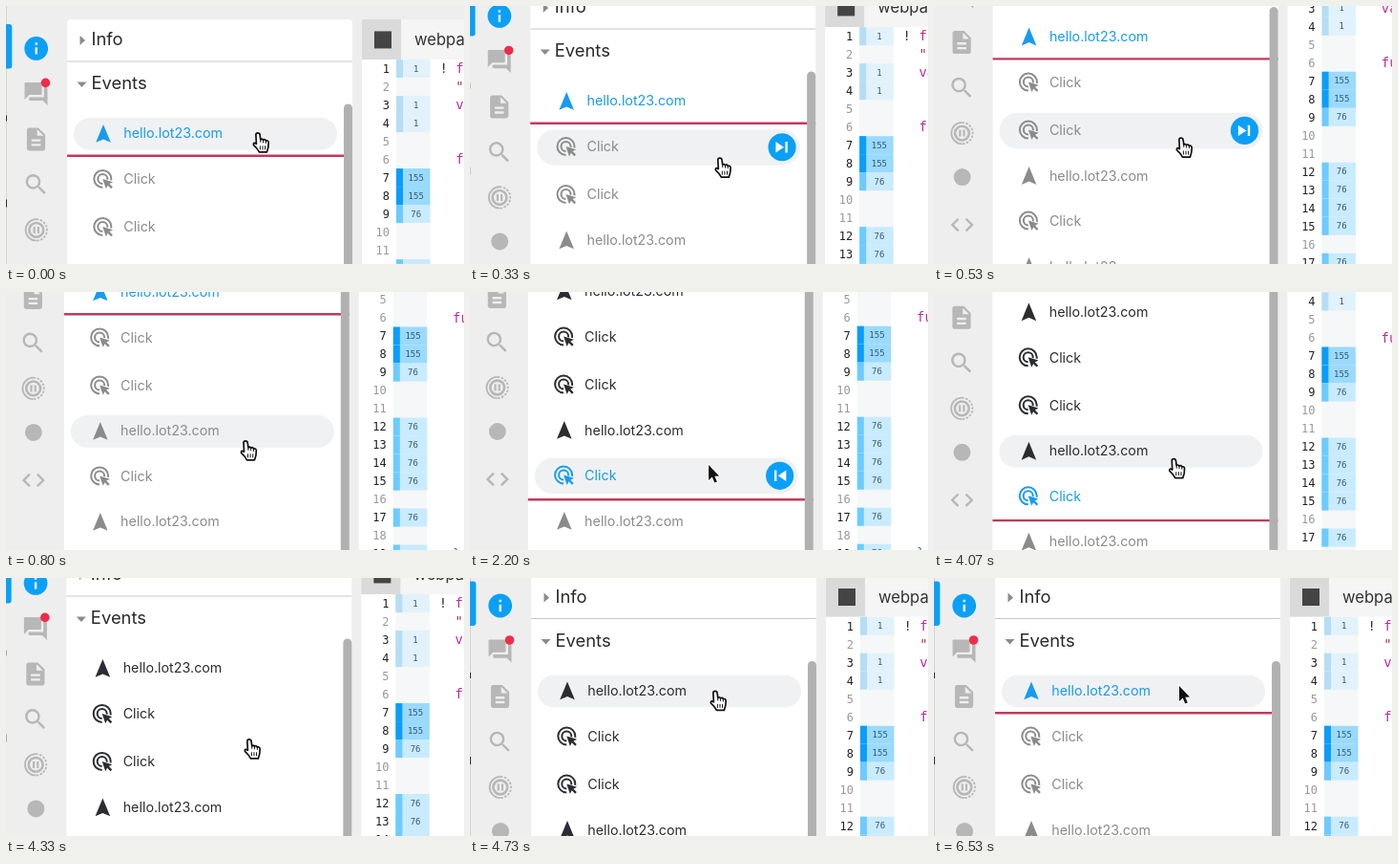
Animation, 480 px wide and 270 px high, one loop 8930 ms. Source, as an HTML page with a canvas:

```html
<!DOCTYPE html>
<html lang="en">
<head>
<meta charset="utf-8">
<title>Event list</title>
<style>
html, body { margin: 0; width: 100%; height: 100%; overflow: hidden; background: #fff; }
canvas { display: block; width: 480px; height: 270px; }
</style>
</head>
<body>
<canvas id="stage" width="480" height="270"></canvas>
<script>
const ctx = document.getElementById('stage').getContext('2d');
const LOOP = 8930, STEP = 200 / 3;
const BLUE = '#0aa0f8', DARK = '#2b2d31', GREY = '#8b8b8b', RAIL_ICON = '#b7b7b7';
const SANS = 'Inter, sans-serif', MONO = '"DejaVu Sans Mono", monospace';

const icons = {
  info: 'M12 2C6.48 2 2 6.48 2 12s4.48 10 10 10 10-4.48 10-10S17.52 2 12 2zm1 15h-2v-6h2v6zm0-8h-2V7h2v2z',
  chat: 'M21 6h-2v9H6v2c0 .55.45 1 1 1h11l4 4V7c0-.55-.45-1-1-1zm-4 6V3c0-.55-.45-1-1-1H3c-.55 0-1 .45-1 1v14l4-4h10c.55 0 1-.45 1-1z',
  file: 'M14 2H6c-1.1 0-2 .9-2 2v16c0 1.1.9 2 2 2h12c1.1 0 2-.9 2-2V8l-6-6zm2 16H8v-2h8v2zm0-4H8v-2h8v2zm-3-5V3.5L18.5 9H13z',
  search: 'M15.5 14h-.8l-.3-.3A6.5 6.5 0 1 0 13.7 14.4l.3.3v.8l5 5 1.5-1.5zm-6 0a4.5 4.5 0 1 1 0-9 4.5 4.5 0 0 1 0 9z',
  code: 'M9.4 16.6L4.8 12l4.6-4.6L8 6l-6 6 6 6zM14.6 16.6l4.6-4.6-4.6-4.6L16 6l6 6-6 6z',
  nav: 'M12 2.5L4.2 21.3 12 18l7.8 3.3z',
  pointer: 'M12 12l3.7 11 2-3.8 3.6 3.6 1.8-1.8-3.6-3.6 3.8-2z',
  next: 'M5 6v12l9-6zM15.5 6h2.5v12h-2.5z',
  back: 'M19 6v12l-9-6zM6 6h2.5v12H6z'
};
for (const name in icons) icons[name] = new Path2D(icons[name]);

const hand = new Path2D('M-2.5 2Q-2.5 0-.5 0 1.5 0 1.7 2L2.4 7Q4 5.5 5 7.5 7 6 8 8.3 10.5 7.5 10.8 10 11 15 9 20H1Q-1 16-5 12.5-5.5 9.2-2 11.5z');
const knuckles = new Path2D('M2.4 7v3M5.2 7.5v3M8 8.3v2.7M2 13.5v4M4.6 13.5v4M7.2 13.5v4');
const arrow = new Path2D('M0 0V16L3.7 12.6 6.2 18.6 8.8 17.5 6.3 11.7 11 11.5z');

const rows = [118, 166, 216, 263.5, 311, 358.5].map((y, i) => ({
  y, click: [1, 2, 4].includes(i), half: [1, 2, 4].includes(i) ? 18.8 : 16.8
}));
const hits = { 1: 1, 3: 1, 4: 1, 7: 155, 8: 155, 9: 76, 12: 76, 13: 76, 14: 76, 15: 76, 17: 76, 19: 76 };
const heat = { 1: ['#b4def6', '#e2f2fb'], 76: ['#6ccbff', '#c9ebfe'], 155: ['#0a9dfb', '#9adafd'] };

// Pointer tip in page coordinates: time, x, y
const pointerKeys = [
  [0, 263, 117], [130, 263, 130], [530, 260.5, 223], [800, 253.3, 273.5], [1000, 253.3, 293],
  [1330, 253.3, 303], [3630, 253.3, 303], [3870, 253, 295], [4070, 253, 271], [4400, 255, 172],
  [4600, 256, 125], [4730, 256, 118], [5400, 256, 118], [5600, 257, 116]
];

const easeInOut = (t, from, to) => {
  const u = Math.min(1, Math.max(0, (t - from) / (to - from)));
  return u < .5 ? 4 * u ** 3 : 1 - 4 * (1 - u) ** 3;
};

function pointerAt(t) {
  const i = pointerKeys.findIndex(k => k[0] > t);
  if (i < 0) return pointerKeys.at(-1).slice(1);
  const [t0, x0, y0] = pointerKeys[i - 1], [t1, x1, y1] = pointerKeys[i];
  const u = (t - t0) / (t1 - t0);
  return [x0 + (x1 - x0) * u, y0 + (y1 - y0) * u];
}

function rect(x, y, w, h, color, radius = 0) {
  ctx.fillStyle = color;
  ctx.beginPath();
  ctx.roundRect(x, y, w, h, radius);
  ctx.fill();
}

function dot(x, y, r, color) {
  rect(x - r, y - r, 2 * r, 2 * r, color, r);
}

function ring(x, y, r, color, width, from = 0, to = 2) {
  ctx.strokeStyle = color;
  ctx.lineWidth = width;
  ctx.beginPath();
  ctx.arc(x, y, r, from * Math.PI, to * Math.PI);
  ctx.stroke();
}

function text(str, x, y, size, color, family = SANS, align = 'left') {
  ctx.font = `${size}px ${family}`;
  ctx.fillStyle = color;
  ctx.textAlign = align;
  ctx.fillText(str, x, y);
}

function icon(name, x, y, scale, color) {
  ctx.save();
  ctx.translate(x, y);
  ctx.scale(scale, scale);
  ctx.translate(-12, -12);
  ctx.fillStyle = color;
  ctx.fill(icons[name], 'evenodd');
  ctx.restore();
}

function polygon(color, ...points) {
  ctx.fillStyle = color;
  ctx.beginPath();
  points.forEach(p => ctx.lineTo(...p));
  ctx.fill();
}

function drawRail() {
  rect(-1, -20, 1.6, 440, '#c4c4c4');
  rect(-1, 99, 2, 6, DARK);
  rect(-1, 187, 2, 8, DARK);
  rect(-4, 3.5, 10.3, 46.5, BLUE, 3);
  icon('info', 31.7, 29, 1.24, BLUE);
  icon('chat', 31.5, 76.5, 1.2, RAIL_ICON);
  dot(41.5, 65, 4.8, '#ee2d48');
  icon('file', 31.5, 124, 1.2, RAIL_ICON);
  icon('search', 31.5, 171.5, 1.2, RAIL_ICON);
  ring(31.8, 219, 11.2, RAIL_ICON, 1.8, .5, 1.5);
  ctx.setLineDash([2.5, 1.5]);
  ring(31.8, 219, 11.2, RAIL_ICON, 1.8, -.5, .5);
  ctx.setLineDash([]);
  ring(31.8, 219, 7.4, RAIL_ICON, 2.6);
  rect(28.6, 215.5, 2.2, 7, RAIL_ICON);
  rect(32.8, 215.5, 2.2, 7, RAIL_ICON);
  dot(32, 265, 9, RAIL_ICON);
  icon('code', 32, 315, 1.2, RAIL_ICON);
}

function drawRow(row, color, hovered, buttonIcon) {
  const { y, click, half } = row;
  if (hovered) rect(71, y - half + .5, 276, half * 2, '#f0f1f3', half);
  if (click) {
    ring(101.3, y - .5, 9, color, 2, .5, 2.05);
    ring(101.3, y - .5, 5, color, 2, .5, 2.05);
    icon('pointer', 101.3, y - .5, .95, color);
    if (hovered) {
      dot(327.9, y + .3, 14.6, BLUE);
      icon(buttonIcon, 327.9, y + .3, .95, '#fff');
    }
  } else {
    icon('nav', 102, y, 1, color);
  }
  text(click ? 'Click' : 'hello.lot23.com', 123.3, y + 5, 14.3, color);
}

function drawPanel(t, pointerY) {
  rect(64, -1.5, 299, 440, '#fff', 4);
  polygon(GREY, [77.5, 15.5], [83, 20.5], [77.5, 25.5]);
  text('Info', 89.5, 26, 18.4, '#2a2a2a');
  rect(64, 42, 299, 1, '#c8c8c8');
  polygon(GREY, [74.5, 64], [84.5, 64], [79.5, 69.5]);
  text('Events', 89.5, 71.6, 18.4, '#2a2a2a');

  const current = t >= 2130 && t < 6530 ? 4 : 0;
  rows.forEach((row, i) => {
    const color = i === current ? '#189bee' : i < current ? DARK : GREY;
    drawRow(row, color, Math.abs(pointerY - row.y) <= row.half + 4.5, t >= 2200 ? 'back' : 'next');
  });
  rect(64, rows[current].y + rows[current].half + 5.3, 299, 2.4, '#bf3b5a');
  rect(354, 87, 9, 360, '#b1b1b1', 4.5);
}

function drawEditor() {
  rect(373, -1.5, 120, 440, '#fff');
  rect(373, -1.5, 120, 42, '#f5f5f5');
  rect(373, -1.5, 41, 42, '#dadada');
  rect(386, 11, 18, 18, '#444');
  text('webpack', 428, 26, 16.6, '#333');
  rect(409, 40.5, 35.5, 400, '#f5f7f8');
  for (let n = 1; n <= 20; n++) {
    const y = 50 + 19 * (n - 1), count = hits[n];
    text(n, 402, y + 4.5, 12, count ? '#222' : '#999', MONO, 'right');
    if (!count) continue;
    rect(409, y - 9.3, 35.5, 19, heat[count][1]);
    rect(409, y - 9.3, 7, 19, heat[count][0]);
    text(count, 429.7, y + 3.2, 9, '#35566f', MONO, 'center');
  }
  const code = (str, line, col, color) => text(str, 454.4 + col * 8.4, 55 + 19 * (line - 1), 14, color, MONO);
  code('!', 1, 0, '#333');
  code('function', 1, 2, '#c02a9c');
  code('"use strict"', 2, 2, '#a8324a');
  code('var', 3, 2, '#c02a9c');
  code('function', 6, 2, '#c02a9c');
  code('}', 19, 2, '#3f6fd0');
}

function drawPointer(t, x, y) {
  const isArrow = t >= 6530 || (t >= 2200 && t < 4700 && y > 290);
  ctx.save();
  if (isArrow) ctx.translate(x, y - 3);
  else ctx.translate(x + 1.4, y + .4);
  ctx.lineJoin = 'round';
  ctx.lineWidth = isArrow ? 2 : 1.7;
  ctx.strokeStyle = isArrow ? '#fff' : '#111';
  ctx.fillStyle = isArrow ? '#111' : '#fff';
  if (isArrow) {
    ctx.stroke(arrow);
    ctx.fill(arrow);
  } else {
    ctx.fill(hand);
    ctx.stroke(hand);
    ctx.lineWidth = 1;
    ctx.stroke(knuckles);
  }
  ctx.restore();
}

function draw(now) {
  const t = Math.floor((now % LOOP + 4) / STEP) * STEP;
  const back = easeInOut(t, 3719, 4690), down = easeInOut(t, -52, 915);
  const panX = -3.2 * (down - back);
  const panY = t < 2000 ? 15.5 - 134.5 * down : -119 * (1 - back);
  const [x, y] = pointerAt(t);

  rect(0, 0, 480, 270, '#eeeeee');
  ctx.save();
  ctx.translate(panX, panY);
  drawRail();
  drawPanel(t, y);
  drawEditor();
  drawPointer(t, x, y);
  ctx.restore();
  requestAnimationFrame(() => draw(performance.now() - start));
}

const start = performance.now();
draw(0);
</script>
</body>
</html>
```
